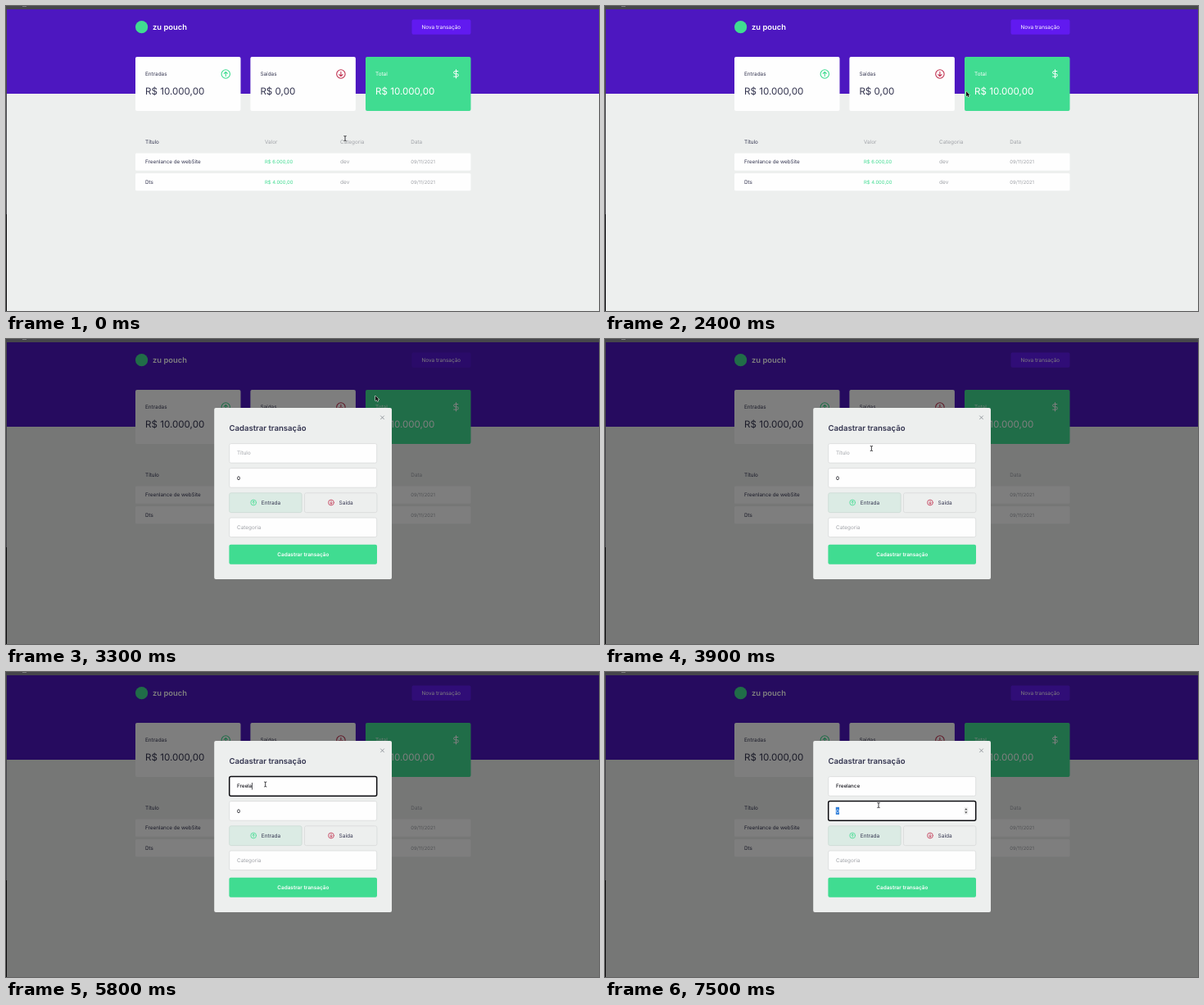
These frames come from a looping animation (724 px wide and 372 px high, 8 s). An HTML page with a canvas:

```html
<!DOCTYPE html>
<html lang="pt-BR">
<head>
<meta charset="utf-8">
<title>Transações</title>
<style>
html, body { margin: 0; width: 100%; height: 100%; overflow: hidden; background: #edefee; }
canvas { display: block; width: 724px; height: 372px; }
</style>
</head>
<body>
<canvas id="stage" width="724" height="372"></canvas>
<script>
const ctx = document.getElementById('stage').getContext('2d');
const LOOP = 8000, STEP = 100, BLINK = 530;
const MODAL_AT = 3300, FOCUS_AT = 4100, VALUE_AT = 7300;
const PAGE = '#edefee', PURPLE = '#4d17c0', WHITE = '#fefefe', GREEN = '#40dc91',
      RED = '#c0304f', INK = '#33344f', MUTED = '#a0a3a8', BORDER = '#d8dada';

// time, x, y of the pointer's hot spot
const pointerPath = [
  [700, 414, 161.5], [900, 500, 172], [1100, 640, 187], [1200, 652, 184],
  [1400, 530, 161], [1500, 497, 154], [1600, 496, 151], [1800, 430, 141],
  [2000, 364, 133], [2200, 390, 126], [2400, 441, 104], [2500, 441, 104],
  [2800, 500, 62], [3000, 530, 34], [3100, 532, 30], [3200, 532, 30],
  [3300, 451, 69], [3500, 372, 113], [3700, 334, 130], [4100, 316.7, 137],
  [6900, 316.7, 137], [7100, 320, 144], [7300, 333, 161], [7500, 334, 162.5]
];
const typedWord = 'Freelance';
const keyTimes = [4600, 5200, 5400, 5600, 5700, 5800, 5900, 6000, 6200];

function pointerAt(t) {
  const next = pointerPath.findIndex(p => p[0] >= t);
  if (next < 0) return pointerPath[pointerPath.length - 1].slice(1);
  if (next === 0) return pointerPath[0].slice(1);
  const [t0, x0, y0] = pointerPath[next - 1], [t1, x1, y1] = pointerPath[next];
  const k = (t - t0) / (t1 - t0);
  return [x0 + (x1 - x0) * k, y0 + (y1 - y0) * k];
}

function box(x, y, w, h, fill, radius = 0, stroke, lineWidth = 0.8) {
  ctx.beginPath();
  ctx.roundRect(x, y, w, h, radius);
  if (fill) { ctx.fillStyle = fill; ctx.fill(); }
  if (stroke) { ctx.strokeStyle = stroke; ctx.lineWidth = lineWidth; ctx.stroke(); }
}

// y is the middle of the capitals
function label(text, x, y, size, color, weight = 400, align = 'left') {
  ctx.font = `${weight} ${size}px Inter, "Open Sans", sans-serif`;
  ctx.textAlign = align;
  ctx.fillStyle = color;
  ctx.fillText(text, x, y + size * 0.36);
}

function strokePath(d, x, y, scale, color, width) {
  ctx.save();
  ctx.translate(x, y);
  ctx.scale(scale, scale);
  ctx.strokeStyle = color;
  ctx.lineWidth = width / scale;
  ctx.lineCap = ctx.lineJoin = 'round';
  ctx.stroke(new Path2D(d));
  ctx.restore();
}

function arrowIcon(x, y, radius, color, down) {
  const s = down ? -1 : 1;
  strokePath(`M10 0A10 10 0 1 1 -10 0A10 10 0 1 1 10 0M0 ${5 * s}V${-5 * s}M-4 ${-s}L0 ${-5 * s}L4 ${-s}`,
    x, y, radius / 10, color, radius > 4 ? 1.1 : 0.8);
}

function drawHeader(hover) {
  box(1, 4, 723, 103, PURPLE);
  ctx.fillStyle = GREEN;
  ctx.beginPath();
  ctx.arc(165.6, 25.7, 7.6, 0, Math.PI * 2);
  ctx.fill();
  label('zu pouch', 179, 25.7, 9.4, '#fff', 600);
  box(495.5, 16.5, 72, 18.3, '#611af0', 2);
  box(495.5, 16.5, 72, 18.3, `rgba(0,0,0,${0.12 * hover})`, 2);
  label('Nova transação', 531.3, 25.9, 6.45, '#fff', 400, 'center');
}

function drawCards() {
  const cards = [['Entradas', 'R$ 10.000,00', 158], ['Saídas', 'R$ 0,00', 298.4], ['Total', 'R$ 10.000,00', 439]];
  for (const [name, amount, x] of cards) {
    const total = name === 'Total';
    box(x, 62, 128.5, 66, total ? GREEN : WHITE, 2);
    label(name, x + 12, 83, 6.4, total ? '#fff' : INK);
    label(amount, x + 12, 104, 11.6, total ? '#fff' : INK);
  }
  arrowIcon(268.3, 83, 5.2, GREEN);
  arrowIcon(408.9, 83, 5.2, RED, true);
  strokePath('M0 -11V11M5 -7H-2.5A3.5 3.5 0 0 0 -2.5 0H2.5A3.5 3.5 0 0 1 2.5 7H-6',
    549.5, 82.8, 0.47, '#fff', 1);
}

function drawTable() {
  const columns = [170, 316, 408, 494.3];
  ['Título', 'Valor', 'Categoria', 'Data'].forEach((name, i) =>
    label(name, columns[i], 165.6, 6.4, i ? MUTED : INK));
  const rows = [['Freenlance de webSite', 'R$ 6.000,00'], ['Dts', 'R$ 4.000,00']];
  rows.forEach(([title, value], i) => {
    const y = 179.5 + i * 24.4;
    box(158, y, 409.5, 21.3, WHITE, 1.5);
    label(title, columns[0], y + 10.6, 6.3, INK);
    label(value, columns[1], y + 10.6, 5.9, GREEN);
    label('dev', columns[2], y + 10.6, 6.5, MUTED);
    label('09/11/2021', columns[3], y + 10.6, 5.9, MUTED);
  });
}

function drawField(y, focused) {
  box(272.7, y, 180, 23.6, WHITE, 2, focused ? '#0c0c10' : BORDER, focused ? 1.5 : 0.8);
}

function drawTitleField(t) {
  const focused = t >= FOCUS_AT && t < VALUE_AT;
  const typed = typedWord.slice(0, keyTimes.filter(k => k <= t).length);
  drawField(127.6, focused);
  if (typed) label(typed, 282, 139.2, 6.2, '#15151c', 500);
  else label('Título', 282, 139.2, 6.3, MUTED);
  if (!focused) return;
  const lastInput = Math.max(FOCUS_AT, ...keyTimes.filter(k => k <= t));
  if (Math.floor((t - lastInput) / BLINK) % 2) return;
  const width = typed ? ctx.measureText(typed).width : 0;
  box(282.2 + width, 135, 0.7, 8.6, '#15151c');
}

function drawValueField(t, pointerY) {
  const focused = t >= VALUE_AT;
  drawField(157.6, focused);
  if (focused) box(281.8, 164.8, 4.2, 9, '#2b7cd9');
  label('0', 282, 169.3, 6.2, focused ? '#d5e6fa' : '#15151c', 500);
  if (focused || pointerY > 157) {
    box(438.3, 164.8, 5, 9, '#efefef');
    ctx.fillStyle = '#444';
    ctx.fill(new Path2D('M439.2 168.2L440.8 166.2L442.4 168.2ZM439.2 170.4L440.8 172.4L442.4 170.4Z'));
  }
}

function drawModal(t, pointerY) {
  box(1, 4, 723, 368, 'rgba(0,0,0,0.5)');
  box(254.2, 84, 216.8, 209, PAGE, 2);
  strokePath('M-2 -2L2 2M2 -2L-2 2', 459.5, 95.8, 1, '#858990', 0.8);
  label('Cadastrar transação', 272.5, 108.6, 9.55, INK, 600);
  drawTitleField(t);
  drawValueField(t, pointerY);
  box(272.7, 187.8, 88.4, 23.8, '#dbebe4', 2, '#cbdad4');
  box(364.5, 187.8, 88.4, 23.8, PAGE, 2, BORDER);
  arrowIcon(302.2, 199.5, 3.4, GREEN);
  arrowIcon(397, 199.5, 3.4, RED, true);
  label('Entrada', 311.8, 199.5, 6.45, INK);
  label('Saída', 406.6, 199.5, 6.5, INK);
  drawField(218, false);
  label('Categoria', 282, 229.7, 6.4, MUTED);
  box(272.4, 250.8, 180.6, 24, GREEN, 2);
  label('Cadastrar transação', 362.8, 262.8, 6.4, '#fff', 600, 'center');
}

function drawPointer(t, x, y) {
  const modal = t >= MODAL_AT;
  const inField = modal && x > 272 && x < 453 && (y > 127 && y < 151.5 || y > 157 && y < 181.5);
  if (t < 800 || inField) {
    strokePath('M-1.2 -3Q0 -3 0 -2.3Q0 -3 1.2 -3M0 -2.3V2.3M-1.2 3Q0 3 0 2.3Q0 3 1.2 3', x, y, 1, '#16161a', 0.8);
    return;
  }
  const hand = !modal && isOnButton(x, y);
  const shape = new Path2D(hand
    ? 'M-.7 .6Q0 -.3 .7 .6V3L3 3.5Q3.6 3.8 3.4 4.8L2.8 7H-.9L-2.4 4.6Q-2.3 3.7 -.7 4.4Z'
    : 'M0 0V6.4L1.5 5.1L2.5 7.3L3.6 6.8L2.6 4.7H4.6Z');
  ctx.save();
  ctx.translate(x, y);
  ctx.lineJoin = 'round';
  ctx.lineWidth = hand ? 0.6 : 1;
  ctx.strokeStyle = hand ? '#16161a' : '#fff';
  ctx.fillStyle = hand ? '#fff' : '#111';
  ctx.stroke(shape);
  ctx.fill(shape);
  ctx.restore();
}

function isOnButton(x, y) {
  return x > 495 && x < 568 && y > 16 && y < 35;
}

function draw(t) {
  const [x, y] = pointerAt(t);
  const hover = t >= MODAL_AT ? Math.max(0, 1 - (t - MODAL_AT) / 200) : Number(isOnButton(x, y));
  box(0, 0, 724, 372, PAGE);
  drawHeader(hover);
  drawCards();
  drawTable();
  if (t >= MODAL_AT) drawModal(t, y);
  // window edges around the page
  box(0, 0, 724, 4, '#46464b');
  box(20, 0, 5, 0.8, '#8a8a8e');
  box(0, 4, 1, 250, '#46464b');
  box(0, 254, 1, 118, '#08080a');
  drawPointer(t, x, y);
}

ctx.textRendering = 'geometricPrecision';
const start = performance.now();
function frame() {
  const t = (performance.now() - start) % LOOP;
  draw(Math.floor(t / STEP) * STEP);
  requestAnimationFrame(frame);
}
frame();
</script>
</body>
</html>
```
